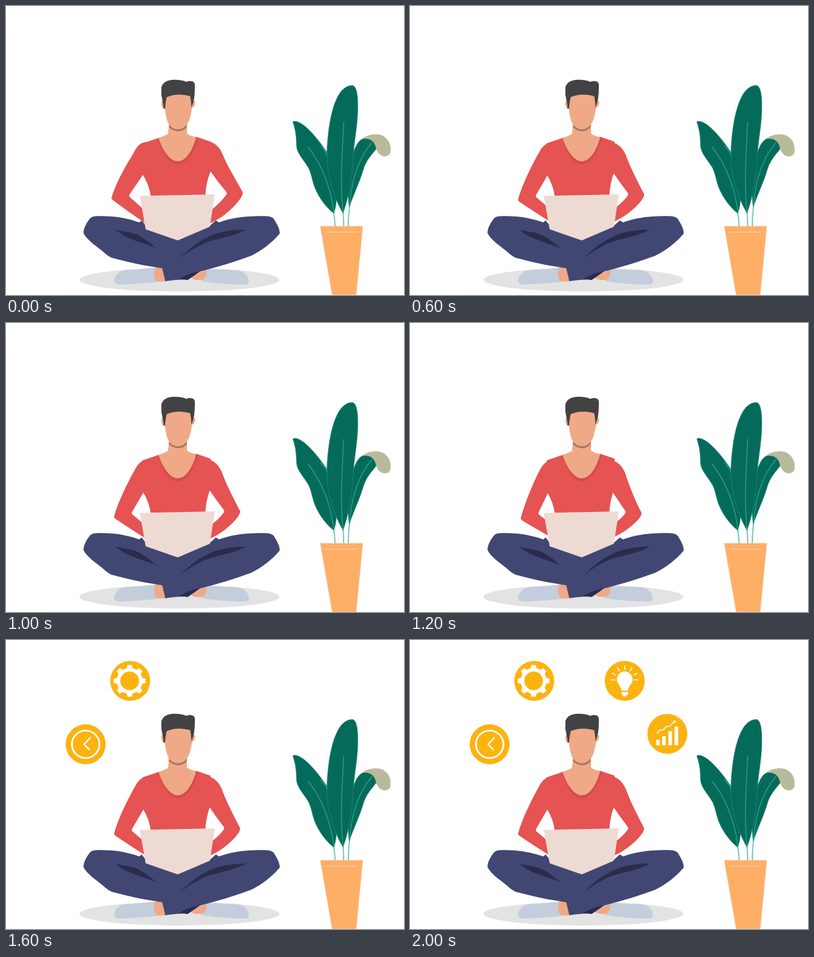
Write an HTML page that moves like this. It is 607x442 px and loops after 3 s.

```html
<!DOCTYPE html>
<html lang="en">
<head>
<meta charset="utf-8">
<title>Working cross-legged</title>
<style>
  html, body { margin: 0; width: 100%; height: 100%; overflow: hidden; background: #fff; }
  svg { display: block; width: 607px; height: 442px; }
  .skin { fill: #f0a986; }
  .shirt { fill: #e55352; }
  .trousers { fill: #414772; }
  .crease { fill: #2a2c4e; }
  .sock { fill: #c4cddb; }
  .leaf { fill: #046b5b; stroke: #2c8f7c; stroke-width: .6; }
  .vein { fill: none; stroke: #2a9d86; stroke-width: 1.4; stroke-linecap: round; }
  .stem { fill: none; stroke: #6cc3ae; stroke-width: 1.7; }
  .disc { fill: #fcb310; }
  .white { fill: #fff; }
  .line { fill: none; stroke: #fff; stroke-linejoin: round; stroke-linecap: round; }
  .icon { visibility: hidden; }
</style>
</head>
<body>
<svg viewBox="0 0 607 442">
  <ellipse cx="264.5" cy="418.7" rx="152.5" ry="18" fill="#e3e3e3"/>

  <g id="plant">
    <path class="stem" d="M499.500 314Q501.500 326 502 338M514 314Q515 326 515 338M524 305Q522 322 522 338"/>
    <path class="leaf" d="M437.500 177.500C438 175.500 443 176 447 178C460 184 477 205 489 223C500 245 506 272 504 297Q503 309 500 317C490 310 478 295 471 278C466 264 466 257 461 247C454 235 444 226 443 214C443 198 441 188 437.500 177.500Z"/>
    <path class="leaf" d="M523.500 308C520 284 521 242 533 216C538 205 544 201 552 203C560 204 567 212 565 218C559 226 549 236 545 250C540 268 530 288 523.500 308Z"/>
    <path class="leaf" d="M514 317C500 293 488 258 489.500 222C491 186 497 150 510 132C517 123 525 120.500 530 122C536 126 537 142 536.500 160C536 184 531 207 530 226C528 258 524 290 514 317Z"/>
    <path d="M543 203C550 197 562 195 571 197C582 200 588 211 586.500 223C585 230 579 231 573 229C567 226 565 220 563 213C560 205 553 202 543 203Z" fill="#b9ba9c"/>
    <path class="vein" d="M461 216C478 238 494 268 500 315M515 178C513 222 509 270 514 315M558 209C539 231 527 262 524 306M480 214Q486 220 490 228"/>
    <path d="M479.500 337H544L534 441.500H497.500Z" fill="#ffae66" stroke="#f6bd8d" stroke-width=".8"/>
    <path d="M486 346H536" stroke="#ffcb97" stroke-width="1.300"/>
  </g>

  <g id="legs">
    <path class="sock" d="M229 400C212 402 195 403 180 404C170 407 164 415 165 422Q167 426 174 426C194 425 212 424 230 422Z"/>
    <path class="sock" d="M303 402C320 403 337 403 353 404C364 406 370 413 370.500 421Q370 426 364 426C342 426 320 424 298 421Z"/>
    <path class="skin" d="M229 398L240 396L244 421L230 421.500Q222 411 229 398Z"/>
    <path class="skin" d="M281 415L305 402Q308 412 300 419L291 419Q286 419 281 415Z"/>
    <path class="trousers" d="M118.500 348C117 342 123 331 128 325Q131 321.500 137 321.500C166 320.500 186 325 203 331L207 328L214 337L275 360L262 404C230 401 194 394 161 385C153 381 150 377 146 374C136 366 123 357 118.500 348Z"/>
    <path class="trousers" d="M417.500 348C418 341 412 331 408 325Q404 321.500 398 321.500C366 320.500 343 324 325 331L320 328L311 336L262 358L238 400L243 421C256 419 267 418 277 419L296 406C324 399 350 391 374 382C390 374 407 361 417.500 348Z"/>
    <path class="crease" d="M167 342C178 345 190 346 198 349C210 354 221 363 230 371C214 363 184 358 167 342Z"/>
    <path class="crease" d="M366 342C350 341.500 330 344.500 316 349.500C296 358 279 371 265 386C283 372 298 364 313 359C333 354 352 350 366 342Z"/>
    <path class="crease" d="M264 418C272 412 284 408 297 405L277 419Q270 417 264 418Z"/>
  </g>

  <g id="body">
    <path class="shirt" d="M208.500 210L232 202L290 200L312 207.500V253Q304.500 271 304 292H221Q218 272 208.500 258Z"/>
    <path class="shirt" id="armL"/>
    <path class="shirt" id="armR"/>
    <path id="seam" d="M209 222V258" stroke="#d9605d" stroke-width=".6"/>
    <path d="M231.500 202.300C238 224 249 242 262.500 242C276 242 288 222 293 201L288 202H234Z" fill="#d34c49"/>
    <path class="skin" d="M232.500 201.500Q242 199 247 195.500L249 178H276V195Q281 199 290 200.500C285 220 275 237.500 262 237.500C249 237.500 238 219 232.500 201.500Z"/>
    <path d="M249 179C252 187 258 188 263 188C269 188 274 184 276 180L275.500 185C273 189 268 191.500 262.500 191.500C257 191.500 252 189 248.500 185Z" fill="#a9765f"/>
  </g>

  <g id="head">
    <path class="skin" d="M240 144Q235.500 146 237.500 153Q239 158 242 157ZM285 145Q290 144 288 151Q286 156 284 155Z"/>
    <path class="skin" d="M243 132H284C286 148 283 164 279 176C275 184 269 188.500 262.500 188.500C255 188.500 249 184 246 176C242 164 241 149 243 132Z"/>
    <path d="M240.500 157C240 149 238 142 237 136V124Q240 115 250 113.500C257 112 268 113 275 116Q280 114 285 115.500Q288 117 288 121C288 132 287.500 140 286 146L283 155.500Q282.500 147 281 138C270 134.500 256 134.500 245 139.500Q243 148 242.500 157Z" fill="#424243"/>
  </g>

  <path d="M204 290.500L318.500 288L311 337.500L262 358.500L213 341.500Z" fill="#eddad3"/>

  <g class="icon" data-at="1400" transform="translate(121.500 159.500)">
    <circle class="disc" r="30.500"/>
    <circle class="line" r="21" stroke-width="2.700"/>
    <path class="line" d="M7-10L-2.500 0L5.500 8" stroke-width="2.200"/>
  </g>
  <g class="icon" data-at="1600" transform="translate(189.500 62.500)">
    <circle class="disc" r="30.500"/>
    <g id="gear" transform="translate(-1 0)"><circle r="17" class="line" stroke-width="5.500"/></g>
  </g>
  <g class="icon" data-at="1800" transform="translate(327.500 62.500)">
    <circle class="disc" r="30.500"/>
    <path class="white" d="M-5 15C-5 8-12 5-12-2A12 12.500 0 0 1 12-2C12 5 5 8 5 15ZM-5 17H5V20Q5 21 3 22Q2 24 0 24Q-2 24-3 22Q-5 21-5 20Z"/>
    <path class="line" d="M0-23V-17M-11-20L-8-15M11-20L8-15M-18.500-11.500L-14-9M18.500-11.500L14-9M-20.500-1.500H-14.500M20.500-1.500H14.500" stroke-width="1.500"/>
  </g>
  <g class="icon" data-at="2000" transform="translate(392.500 143.500)">
    <circle class="disc" r="30.500"/>
    <path class="white" d="M-17 9H-11.500V17.500H-17ZM-8 3.500H-2.500V17.500H-8ZM1.500-4H7V17.500H1.500ZM11-11H16.500V17.500H11Z"/>
    <path class="line" d="M-15.500-1L-12-5.500L-6-6L-2-11L3-11.500L10-18" stroke-width="1.500"/>
    <circle class="white" cx="11" cy="-18.500" r="2"/>
  </g>
</svg>
<script>
const STEP = 200, LOOP = 3000;
// Arm pose per step: 0 = elbows out, 2 = elbows in. The last pose holds.
const POSES = [0, 1, 2, 1, 0, 1, 2, 0, 1, 2, 1];
const $ = id => document.getElementById(id);
const icons = [...document.querySelectorAll('.icon')];

for (let i = 0; i < 8; i++) {
  const tooth = document.createElementNS('http://www.w3.org/2000/svg', 'path');
  tooth.setAttribute('d', 'M-5-18L-3.200-24.300H3.200L5-18Z');
  tooth.setAttribute('class', 'white');
  tooth.setAttribute('transform', `rotate(${i * 45})`);
  $('gear').append(tooth);
}

function leftArm(k) {
  const x = 4 * k, y = 2.5 * k;
  return `M213 ${208 + k}Q${202 + k} ${209 + 2 * k} ${195 + 1.2 * k} ${224 + k}
    C${183 + 2 * k} ${244 + k} ${167 + x} ${271 + y} ${161 + x} ${293 + y}
    Q${160.5 + x} ${295.5 + y} ${163 + x} ${297 + y}
    Q${187 + x / 2} ${315 - k / 2} 212 ${332 - 3 * k}
    V${313 - 4 * k}L${188.5 + x} ${292 + k / 2}
    Q${187 + x} ${290.5 + k / 2} ${188.5 + x} ${288 + k / 2}L210 ${256.5 + 2 * k}Z`;
}

function rightArm(k) {
  const x = 4 * k, y = 2.5 * k;
  return `M309 ${207 + 1.5 * k}Q${323 - k} ${210 + 2 * k} ${330 - 1.2 * k} ${226 + k}
    C${338 - 2 * k} ${246 + k} ${351 - x} ${266 + y} ${361 - x} ${285 + y}
    Q${361.5 - x} ${288 + y} ${359 - x} ${292 + y}
    C${352 - x} ${304 + y / 2} ${333 - x / 2} ${323 - 2 * k} 312 ${332 - 2.5 * k}
    V${313 - 3.5 * k}Q${329 - x / 2} ${299 - k} ${336.5 - x} ${288 + y / 2}
    Q${337.5 - x} ${286 + y / 2} ${335 - x} ${283 + y / 2}
    Q${322 - x / 2} ${268 + 2 * k} 310 ${250 + 5 * k}Z`;
}

let last = -1;
function draw(now) {
  const t = now % LOOP;
  const step = Math.min(Math.floor(t / STEP), POSES.length - 1);
  if (step !== last) {
    const pose = POSES[last = step];
    $('armL').setAttribute('d', leftArm(pose));
    $('armR').setAttribute('d', rightArm(pose));
    $('seam').style.visibility = pose ? 'hidden' : 'visible';
    for (const icon of icons) icon.style.visibility = t >= +icon.dataset.at ? 'visible' : 'hidden';
  }
}

const start = performance.now();
function tick() {
  draw(performance.now() - start);
  requestAnimationFrame(tick);
}
tick();
</script>
</body>
</html>
```
